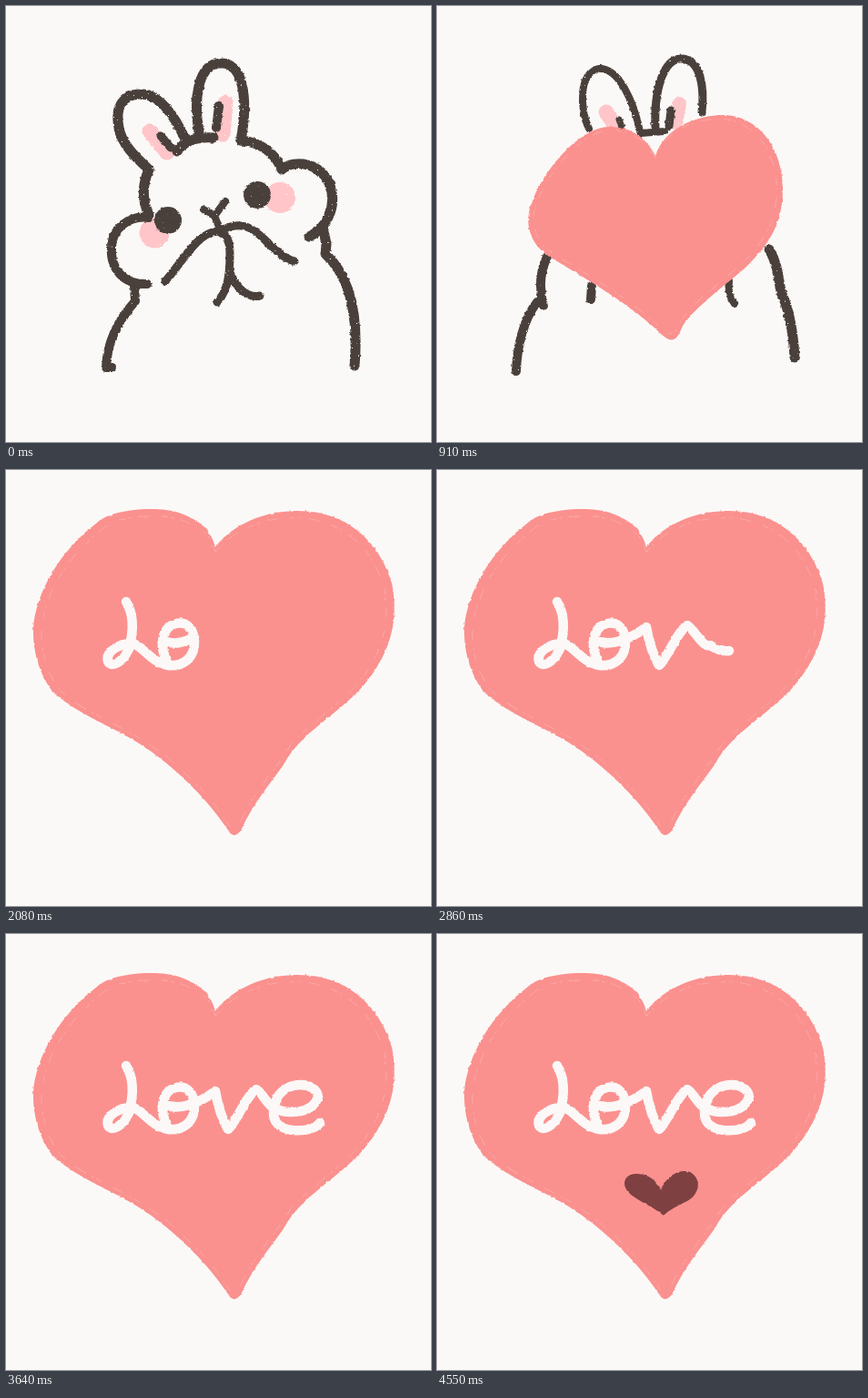
Recreate the animation shown at these times as an HTML page. Size 467 by 480 pixels, loop 4680 ms.

```html
<!DOCTYPE html>
<html lang="en">
<head>
<meta charset="utf-8">
<title>Bunny love</title>
<style>
html, body { margin: 0; width: 100%; height: 100%; overflow: hidden; background: #fbf9f7; }
svg { display: block; width: 100vw; height: 100vh; }
path { stroke-linecap: round; stroke-linejoin: round; }
</style>
</head>
<body>
<svg viewBox="0 0 467 480" aria-label="A bunny sends a heart with the word Love">
  <defs>
    <filter id="rough" filterUnits="userSpaceOnUse" x="0" y="0" width="467" height="480" color-interpolation-filters="sRGB">
      <feTurbulence type="fractalNoise" baseFrequency=".22" numOctaves="2" seed="4"/>
      <feDisplacementMap in="SourceGraphic" scale="2.5" xChannelSelector="R" yChannelSelector="G"/>
    </filter>
    <filter id="crayon" filterUnits="userSpaceOnUse" x="0" y="0" width="467" height="480" color-interpolation-filters="sRGB">
      <feTurbulence type="fractalNoise" baseFrequency=".3" numOctaves="2" seed="7" result="n"/>
      <feDisplacementMap in="SourceGraphic" in2="n" scale="3" xChannelSelector="R" yChannelSelector="G" result="line"/>
      <feTurbulence type="fractalNoise" baseFrequency=".45" numOctaves="1" seed="11"/>
      <feColorMatrix values="0 0 0 0 0  0 0 0 0 0  0 0 0 0 0  14 0 0 0 -10.2" result="specks"/>
      <feComposite in="line" in2="specks" operator="out"/>
    </filter>
  </defs>
  <g id="scene"></g>
</svg>
<script>
const STEP = 130, COUNT = 36;
const INK = '#4a403b', BLUSH = '#ffc5c8', PINK = '#fa918f', CHALK = '#fcf8f7', WINE = '#7e4040';
const scene = document.getElementById('scene');

const line = (d, w = 11, color = INK) => `<path d="${d}" fill="none" stroke="${color}" stroke-width="${w}"/>`;
const shape = (d, color) => `<path d="${d}" fill="${color}"/>`;
const dot = (x, y, r, color) => `<circle cx="${x}" cy="${y}" r="${r}" fill="${color}"/>`;
const group = (inner, transform = '') => `<g transform="${transform}">${inner}</g>`;
const textured = (inner, name) => `<g filter="url(#${name})">${inner}</g>`;
const scaleAt = (x, y, sx, sy = sx) => `translate(${x} ${y}) scale(${sx} ${sy}) translate(${-x} ${-y})`;

const head = [
  line('M158 138L177 161', 17, BLUSH), line('M241 107L238 141', 17, BLUSH),
  dot(163, 250, 16.5, BLUSH), dot(301, 211, 17, BLUSH),
  line('M170 143L181 156', 9), line('M234 110L231 134', 10),
  line('M157 180C142 166 127 152 124 134C119 108 131 98 146 97C168 95 186 122 197 147'),
  line('M212 138C206 105 210 63 236 63C262 62 266 105 258 148'),
  line('M188 160C197 147 212 144 228 145'),
  line('M258 148C278 150 295 160 303 180C318 168 345 173 355 195C366 222 350 246 333 254'),
  line('M157 180C149 198 150 215 157 230'),
  line('M157 233C135 230 117 245 116 265C114 290 130 307 155 306', 10),
  dot(178, 236, 15, INK), dot(276, 208, 15, INK),
  line('M217 224L229 231L241 215M229 231L236 248', 8)
].join('');

const arms = line('M175 303C195 280 210 250 232 248C248 250 247 270 245 295C243 310 238 320 232 326M246 293C252 310 265 322 279 319', 9)
  + line('M238 246C260 236 272 245 285 258C295 268 305 278 317 281', 9);

const body = line('M141 308L142 325C124 345 111 370 110 398L116 398', 10)
  + line('M348 243L352 262L351 273C375 295 388 335 383 396');

const openBody = line('M121 276C112 295 113 315 117 330M110 326C95 345 88 375 87 402', 10)
  + line('M365 268C378 290 374 310 381 322C390 345 392 370 393 387')
  + line('M170 308L169 323', 10) + line('M321 303C319 315 322 322 327 328', 8);

const ears = line('M186 117L194 130', 17, BLUSH) + line('M266 108L262 128', 16, BLUSH)
  + line('M200 125L203 133', 7) + line('M257 115L255 132', 9)
  + line('M167 135C157 115 155 72 178 69C200 68 216 105 223 138', 8)
  + line('M224 140L250 138', 8)
  + line('M240 135C238 90 250 58 268 58C290 58 294 90 291 117', 9);

const heldHeart = 'M240 165C249 135 285 120 315 120C360 122 380 165 380 200C380 240 365 262 340 287C320 305 285 330 270 352C263 370 258 372 245 360C215 330 160 298 125 277C100 262 95 235 105 215C115 185 155 133 190 133C215 134 230 145 240 165Z';
const bigHeart = 'M230 85C245 65 275 46 318 45C375 44 411 80 424 125C433 170 419 206 393 237C371 264 322 291 306 323C290 346 272 366 258 397C252 404 248 404 243 395C214 352 169 312 129 291C99 275 67 261 49 241C31 215 26 180 33 155C42 120 65 85 100 58C115 43 165 39 190 47C212 55 225 65 230 85Z';
const smallHeart = 'M246 282C252 265 268 258 278 262C292 270 288 287 275 294C265 299 256 303 249 310C238 300 220 294 211 285C202 275 206 265 218 264C232 263 242 272 246 282Z';

const heart = d => shape(d, PINK)
  + `<path d="${d}" fill="none" stroke="#fcb5b2" stroke-width="1" stroke-dasharray="7 4 2 9 12 15" opacity=".7" transform="${scaleAt(230, 215, .955)}"/>`;

const L = 'M132 145C140 158 141 175 135 197C128 212 116 218 112 211C109 200 125 190 140 191C152 196 160 212 178 215';
const o = 'C195 217 208 206 207 188C206 172 196 167 187 169C170 173 168 195 178 214';
const v = 'M173 187C188 195 210 188 230 173C233 190 238 205 244 215C255 205 262 180 275 171';
const e = 'C280 173 284 183 292 190C308 200 338 198 343 179C341 163 310 160 298 180C288 205 298 214 315 216C330 217 340 214 345 208';
const words = [
  'M128 149C134 165 141 185 139 202C137 215 124 222 116 215C110 207 118 195 132 194C145 194 150 200 159 205',
  L + o + 'M173 187C185 194 197 189 207 184',
  L + o + v + 'C285 178 292 196 300 193C308 198 315 200 321 199',
  L + o + v + e
];
const wordStarts = [10, 15, 20, 25];
const finale = 31;

// head turn, head shift x, head shift y
const poses = [[0, 0, 0], [1, 1, 1], [3, 1, -1], [5, 0, -2], [7, -1, -4], [10, -3, -7], [10, -3, -9]];

function bunny(i) {
  if (i >= 7) return textured(ears + openBody, 'crayon');
  const [turn, x, y] = poses[i];
  const top = group(head, `translate(${x} ${y}) rotate(${turn} 243 280)`);
  const low = i < 5 ? group(body, scaleAt(247, 320, 1 + i * .012)) + arms : openBody;
  return textured(top + low, 'crayon');
}

function bigPicture(i) {
  const swollen = i < finale ? i % 2 : 1 - i % 2;
  const n = wordStarts.filter(s => s <= i).length - 1;
  const art = group(heart(bigHeart), swollen ? `translate(-1 0) ${scaleAt(228, 222, 1.02, 1.017)}` : '')
    + group(line(words[n], 10.5, CHALK), swollen ? 'translate(-1 1)' : '')
    + (i >= finale ? shape(smallHeart, WINE) : '');
  return textured(art, 'rough');
}

function picture(i) {
  if (i >= 10) return bigPicture(i);
  if (i === 9) return textured(group(heart(bigHeart), scaleAt(230, 225, .94)), 'rough');
  if (i === 8) return bunny(i) + textured(group(heart(bigHeart), scaleAt(236, 240, .83)), 'rough');
  const size = { 5: .25, 6: .55, 7: 1 }[i];
  return bunny(i) + (size ? textured(group(heart(heldHeart), scaleAt(242, 255, size)), 'rough') : '');
}

let shown = -1;
function draw(now) {
  const i = Math.floor(now / STEP) % COUNT;
  if (i !== shown) scene.innerHTML = picture(shown = i);
}

const start = performance.now();
function tick() {
  draw(performance.now() - start);
  requestAnimationFrame(tick);
}
tick();
</script>
</body>
</html>
```
